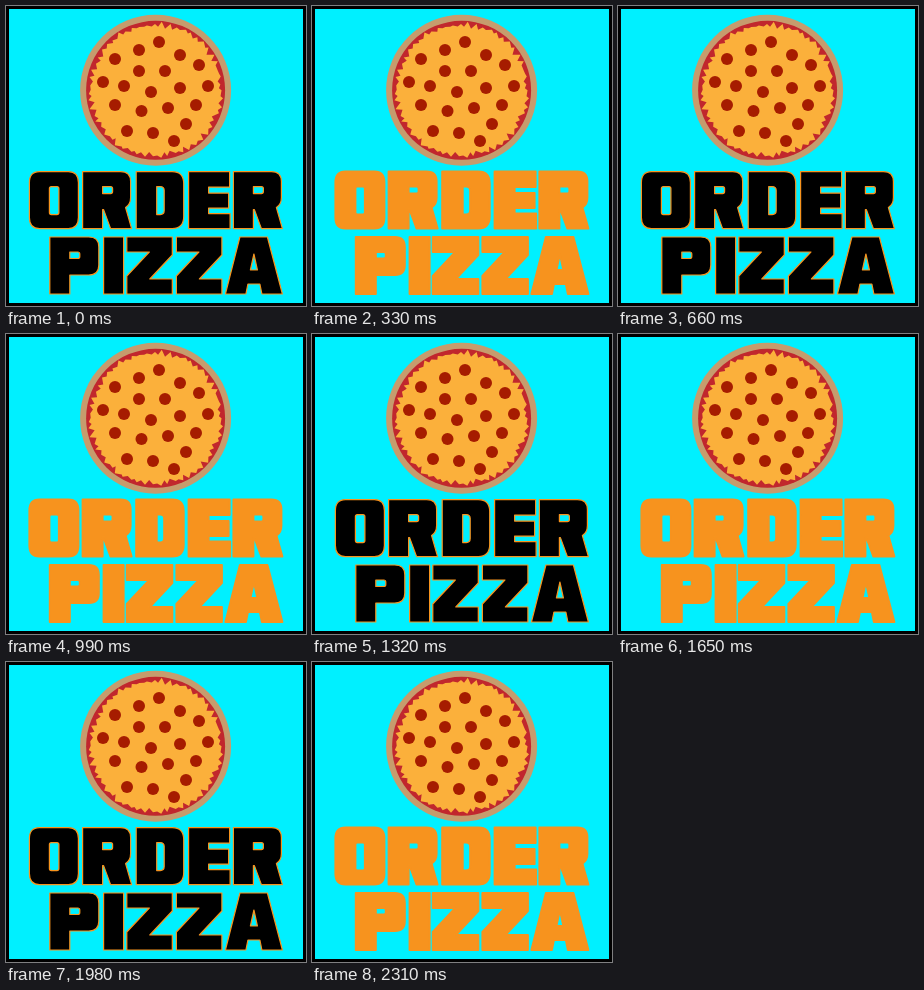
Write an HTML page with a canvas that moves like this. It is 300 px wide and 300 px high and loops after 2.64 s.

```html
<!DOCTYPE html>
<html lang="en">
<head>
<meta charset="utf-8">
<title>Order Pizza</title>
<style>
html, body { margin: 0; width: 100%; height: 100%; overflow: hidden; background: #00f0ff; }
canvas { display: block; width: 100vw; height: 100vh; }
</style>
</head>
<body>
<canvas id="stage" width="300" height="300" role="img" aria-label="ORDER PIZZA">ORDER PIZZA</canvas>
<script>
const ctx = document.getElementById('stage').getContext('2d');
const STEP = 330;
const BORDER = 3;
const ORANGE = '#f7931e';

// Block letters, 57 units tall, counters cut out with the even-odd rule
const glyphs = {
  O: 'M10 0H39Q49 0 49 11V46Q49 57 39 57H10Q0 57 0 46V11Q0 0 10 0ZM20 17V41Q20 43 22 43H27.5Q29.5 43 29.5 41V17Q29.5 15 27.5 15H22Q20 15 20 17Z',
  R: 'M0 0H38Q48 0 48 10V26Q48 33 43 36L49 57H28L21 38H20V57H0ZM20 15V22H28Q30 22 30 20V17Q30 15 28 15Z',
  D: 'M0 0H36Q47.5 0 47.5 12V45Q47.5 57 36 57H0ZM20.5 15V43H24Q28 43 28 39V19Q28 15 24 15Z',
  E: 'M0 0H41V15.5H20V21.5H40V36.5H20V42H41.5V57H0Z',
  P: 'M0 0H39Q49 0 49 10V28Q49 38 39 38H20V57H0ZM20 15V21.5H28Q30 21.5 30 19.5V17Q30 15 28 15Z',
  I: 'M0 0H20V57H0Z',
  Z: 'M0 0H45.5V18L23 42H45.5V57H0V39L22.5 15H0Z',
  A: 'M14.5 0H42L57 57H36.5L34.5 47H22.5L20.5 57H0ZM28.5 17L25 33H32Z'
};
for (const k in glyphs) glyphs[k] = new Path2D(glyphs[k]);

const lines = [
  { text: 'ORDER', y: 165.6, xs: [23.4, 76.6, 130.2, 182.6, 227.4] },
  { text: 'PIZZA', y: 231, xs: [43.8, 97.6, 120.8, 170.4, 219.4] }
];

const pepperoni = [
  [153, 36], [133, 44], [174, 49], [109, 53], [193, 59], [133, 65], [159, 65],
  [97, 76], [118, 80], [202, 80], [174, 82], [145, 86], [109, 99], [135.5, 105],
  [162, 102], [190, 99], [180, 118], [121, 125], [147, 127], [168, 135]
];

function disc(x, y, r, color) {
  ctx.fillStyle = color;
  ctx.beginPath();
  ctx.arc(x, y, r, 0, Math.PI * 2);
  ctx.fill();
}

function cheese(cx, cy) {
  const n = 110;
  let seed = 17;
  const random = () => (seed = seed * 16807 % 2147483647) / 2147483647;
  ctx.fillStyle = '#fbb03b';
  ctx.beginPath();
  for (let i = 0; i < n; i++) {
    const a = (i + random() * 0.7) / n * Math.PI * 2;
    const r = i % 2 ? 62 + random() * 4 : 65 + random() * 4;
    ctx.lineTo(cx + r * Math.cos(a), cy + r * Math.sin(a));
  }
  ctx.fill();
}

function pizza() {
  const x = 149.6, y = 84.3;
  disc(x, y, 75.5, '#c69c6d');
  disc(x, y, 69.5, '#c1272d');
  cheese(x, y);
  for (const [px, py] of pepperoni) disc(px, py, 6, '#a61c00');
}

function lettering(fill, outline) {
  ctx.lineWidth = outline;
  ctx.lineJoin = 'round';
  ctx.strokeStyle = ORANGE;
  ctx.fillStyle = fill;
  for (const { text, y, xs } of lines) {
    xs.forEach((x, i) => {
      ctx.save();
      ctx.translate(x, y);
      ctx.fill(glyphs[text[i]], 'evenodd');
      ctx.stroke(glyphs[text[i]]);
      ctx.restore();
    });
  }
}

function draw(t) {
  const lit = Math.floor(t / STEP) % 2 === 1;
  ctx.fillStyle = '#000';
  ctx.fillRect(0, 0, 300, 300);
  ctx.fillStyle = '#00f0ff';
  ctx.fillRect(BORDER, BORDER, 300 - 2 * BORDER, 300 - 2 * BORDER);
  pizza();
  if (lit) lettering(ORANGE, 2);
  else lettering('#000', 1.2);
}

const start = performance.now();
function tick() {
  draw(performance.now() - start);
  requestAnimationFrame(tick);
}
tick();
</script>
</body>
</html>
```
